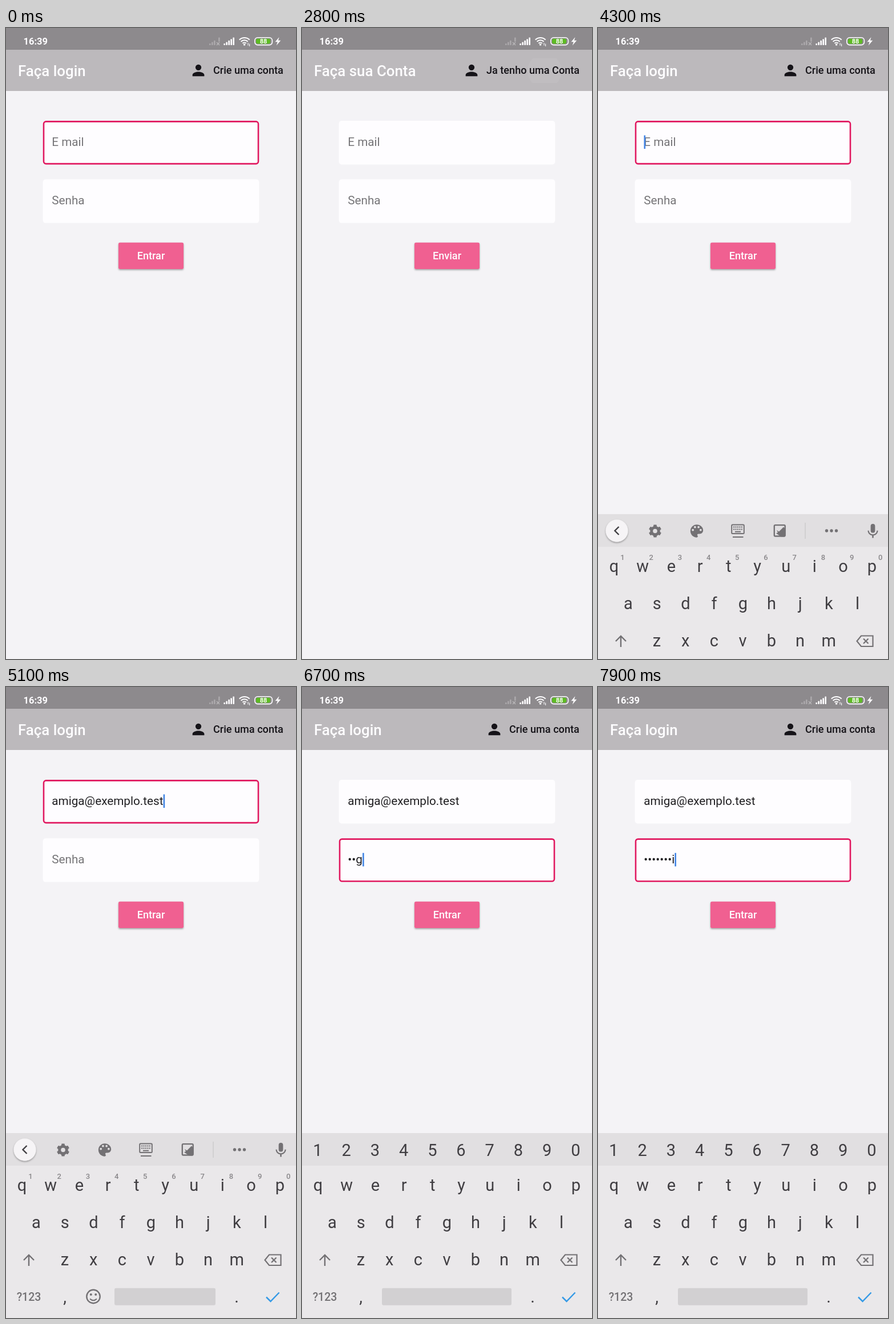
An HTML page that plays this animation: 508 px wide and 1102 px high, repeating every 8000 ms.

```html
<!DOCTYPE html>
<html lang="pt">
<head>
<meta charset="utf-8">
<title>Login</title>
<style>
html, body { margin: 0; width: 100%; height: 100%; overflow: hidden; background: #f4f3f6; }
svg { display: block; width: 508px; height: 1102px; font-family: Roboto, Arial, sans-serif; }
.mid { text-anchor: middle; }
.medium { font-weight: 500; }
.title { font-size: 25.85px; fill: #fefdff; }
.action { font-size: 18.1px; fill: #151318; }
.field { font-size: 20.7px; fill: #212023; }
.hint { fill: #767578; }
.key { font-size: 29px; fill: #403e42; text-anchor: middle; }
.sup { font-size: 13px; fill: #89878a; text-anchor: middle; font-weight: 500; }
.line { fill: none; stroke: #737174; stroke-width: 2.4; }
.solid { fill: #737174; }
.ring { fill: none; stroke: #e0185f; stroke-width: 2.6; }
</style>
</head>
<body>
<svg viewBox="0 0 508 1102" xmlns="http://www.w3.org/2000/svg">
  <defs>
    <filter id="soft" x="-30%" y="-30%" width="160%" height="170%">
      <feDropShadow dx="0" dy="1.6" stdDeviation="1.5" flood-color="#000" flood-opacity=".36"/>
    </filter>
    <clipPath id="ink"><rect x="274" y="53" width="212" height="43" rx="3"/></clipPath>
  </defs>

  <rect width="508" height="1102" fill="#f4f3f6"/>
  <rect width="508" height="110" fill="#bcb9bc"/>
  <rect width="508" height="38" fill="#8d8a8d"/>

  <g id="status" fill="#fefdff">
    <text x="30.5" y="29.3" font-size="16.5" font-weight="600">16:39</text>
    <g id="bars"></g>
    <path d="M369 25l5 5m0-5l-5 5" stroke="#bab8ba" stroke-width="1.4"/>
    <g fill="none" stroke="#fefdff" stroke-width="2">
      <path d="M408.7 20.6a12.8 12.8 0 0 1 18 0M411.6 23.8a8.6 8.6 0 0 1 12 0M414.4 26.8a4.6 4.6 0 0 1 6.4 0"/>
      <path d="M424 26v4.5m2.6-3v4.5" stroke-width="1.1"/>
    </g>
    <circle cx="417.6" cy="29" r="1.8"/>
    <rect x="435.8" y="16.8" width="30.6" height="12.8" rx="5" fill="#8d8a8d" stroke="#fefdff" stroke-width="1.6"/>
    <rect x="438" y="18.8" width="25" height="8.8" rx="3" fill="#5dbb23"/>
    <text class="mid" x="451" y="27.3" font-size="11" font-weight="600">88</text>
    <path d="M478.5 16l-7 8.3h4.2l-2 6.2 7.5-8.8h-4.4z"/>
  </g>

  <text id="title" class="title medium" x="21" y="84"></text>
  <g clip-path="url(#ink)"><circle id="splash" cx="425" cy="75" r="0" fill="#fff"/></g>
  <g id="account">
    <path d="M12 12a4 4 0 1 0 0-8 4 4 0 0 0 0 8zm0 2c-2.67 0-8 1.34-8 4v2h16v-2c0-2.66-5.33-4-8-4z"
      transform="translate(-15.5 58.5) scale(1.2926)" fill="#151318"/>
    <text id="action" class="action medium" x="26" y="80.3"></text>
  </g>

  <g fill="#fefdff">
    <rect x="64.6" y="162" width="378.8" height="76.4" rx="5"/>
    <rect x="64.6" y="264.2" width="378.8" height="76.4" rx="5"/>
  </g>
  <rect id="ringMail" class="ring" x="66" y="163.4" width="376" height="73.7" rx="4"/>
  <rect id="ringPass" class="ring" x="66" y="265.6" width="376" height="73.7" rx="4"/>
  <text id="mail" class="field" x="80.3" y="206"></text>
  <text id="pass" class="field" x="80.3" y="308"></text>
  <rect id="caret" width="2.6" height="23.5" fill="#4285e4"/>

  <rect x="197" y="374.7" width="114" height="46.2" rx="2.6" fill="#f06091" filter="url(#soft)"/>
  <text id="send" class="action medium mid" x="254" y="404" style="fill:#fefdff"></text>

  <g id="keyboard">
    <rect y="779" width="508" height="323" fill="#eae8ea"/>
    <rect y="779" width="508" height="57" fill="#e1dfe1"/>
    <g id="tools">
      <circle cx="33" cy="808" r="19.5" fill="#f6f4f6" filter="url(#soft)"/>
      <path class="line" d="M36.5 801l-7 7 7 7" style="stroke:#403e42"/>
      <g id="icons">
        <g id="gear" transform="translate(100 808.5)">
          <circle class="line" r="6.3" style="stroke-width:5"/>
        </g>
        <g transform="translate(173 808.5) scale(1.24)">
          <path class="solid" d="M0-9c-5 0-9 4-9 9s4 9 9 9c.8 0 1.5-.7 1.5-1.5 0-.4-.2-.7-.4-1-.2-.3-.4-.6-.4-1 0-.8.7-1.5 1.5-1.5H4c2.8 0 5-2.2 5-5C9-5.400 5-9 0-9z"/>
          <g fill="#e1dfe1">
            <circle cx="-5.500" cy="-1.500" r="1.500"/><circle cx="-2.500" cy="-5.500" r="1.500"/>
            <circle cx="2.500" cy="-5.500" r="1.500"/><circle cx="5.500" cy="-1.500" r="1.500"/>
          </g>
        </g>
        <rect class="line" x="234.200" y="797.500" width="21.600" height="15.500" rx="1.500" style="stroke-width:2"/>
        <path class="line" d="M237 801.500h16M237 805.500h16" stroke-dasharray="2.200 1.200" style="stroke-width:2.200"/>
        <path class="line" d="M240 809.800h10M236 819h18.500" style="stroke-width:2"/>
        <path class="line" d="M318 817.500h-7.500q-1.700 0-1.700-1.700v-16q0-1.700 1.700-1.700h15.500q1.700 0 1.700 1.700v16q0 1.700-1.700 1.700z"/>
        <path class="solid" d="M313 807l4 2.500 8-8 2 2v15h-6l-9-6 3-1.500z"/>
        <path d="M363 794v28" stroke="#c9c7c9" stroke-width="1.300"/>
        <g class="solid"><circle cx="400.500" cy="808" r="2.700"/><circle cx="409" cy="808" r="2.700"/><circle cx="417.500" cy="808" r="2.700"/></g>
      </g>
      <text id="suggest" class="mid" x="254" y="815" font-size="20" fill="#403e42"></text>
      <path class="solid" transform="translate(466 793.500) scale(1.290)" d="M12 14a3 3 0 0 0 3-3V5a3 3 0 0 0-6 0v6a3 3 0 0 0 3 3zm5.300-3c0 3-2.540 5.100-5.300 5.100S6.700 14 6.700 11H5c0 3.400 2.700 6.200 6 6.700V21h2v-3.300c3.300-.5 6-3.300 6-6.700z"/>
      <g id="sups"></g>
    </g>
    <g id="digits"></g>
    <g id="letters"></g>
    <path class="line" d="M40 1011v-19M31 1001l9-9 9 9"/>
    <path class="line" d="M461 991.500h20.500v18.500H461l-7.500-9.250zM465 996.500l8.500 8.500m0-8.500l-8.500 8.500" style="stroke-width:2.200"/>
    <text class="mid" x="40" y="1072" font-size="19.5" fill="#737174" font-weight="500">?123</text>
    <text class="key" x="103" y="1075">,</text>
    <text class="key" x="404" y="1075">.</text>
    <g id="smile">
      <circle class="line" cx="153" cy="1064.500" r="11.700"/>
      <path class="line" d="M147 1068.500q6 5.500 12 0" style="stroke-width:2"/>
      <circle class="solid" cx="148.800" cy="1061" r="2"/><circle class="solid" cx="157.200" cy="1061" r="2"/>
    </g>
    <rect id="space" y="1049.800" height="30" rx="3" fill="#d2d0d2"/>
    <path d="M456 1065.500l7.500 7.500 15-15.500" fill="none" stroke="#359ae6" stroke-width="2.500"/>
    <g id="popup">
      <rect x="-25" y="-117" width="50" height="144" rx="5" fill="#fdfcfe" filter="url(#soft)"/>
      <text id="popChar" class="mid" y="-67.500" font-size="36" fill="#403e42"></text>
      <g fill="#403e42"><circle cx="8" cy="-53" r="1.200"/><circle cx="12.500" cy="-53" r="1.200"/><circle cx="17" cy="-53" r="1.200"/></g>
    </g>
  </g>
</svg>
<script>
const LOOP = 8000, TICK = 100, PITCH = 50.2;
const MAIL = 'amiga@exemplo.test';
const SECRET = 'wdguemti';
const $ = id => document.getElementById(id);
const set = (el, attrs) => { for (const k in attrs) el.setAttribute(k, attrs[k]); };

// Value of the latest step at or before t.
const hold = (t, steps) => steps.reduce((v, [at, next]) => t >= at ? next : v, steps[0][1]);

// Linear value between points.
function ramp(t, points) {
  const i = points.findIndex(p => p[0] > t);
  if (i === 0) return points[0][1];
  if (i < 0) return points[points.length - 1][1];
  const [a, x] = points[i - 1], [b, y] = points[i];
  return x + (y - x) * (t - a) / (b - a);
}

// Keyboard layout: letters, first centre, row centre.
const rows = [['qwertyuiop', 28, 870], ['asdfghjkl', 53, 935], ['zxcvbnm', 103, 1000]];
const keys = {};
const label = (cls, x, y, s) => `<text class="${cls}" x="${x}" y="${y}">${s}</text>`;
let letters = '', digits = '', sups = '';
for (const [chars, x0, y] of rows) {
  [...chars].forEach((c, i) => {
    const x = x0 + i * PITCH;
    keys[c] = [x, y];
    letters += label('key', x, y + 9.5, c);
  });
}
[...'1234567890'].forEach((d, i) => {
  digits += label('key', 27.5 + i * PITCH, 819, d);
  sups += label('sup', 43 + i * PITCH, 858.5, d);
});
$('letters').innerHTML = letters;
$('digits').innerHTML = digits;
$('sups').innerHTML = sups;

let bars = '';
for (const [x, color] of [[356, '#aba8ab'], [381.3, '#fefdff']]) {
  for (let i = 0; i < 5; i++) {
    if (x < 380 && i === 3) continue;
    const h = 3 + i * 2.6, cut = x < 380 && i === 4 ? 6 : 0;
    bars += `<rect x="${x + i * 4}" y="${30 - h}" width="2.7" height="${h - cut}" rx="1" fill="${color}"/>`;
  }
}
$('bars').innerHTML = bars;

let teeth = '';
for (let a = 0; a < 360; a += 60)
  teeth += `<rect class="solid" x="-2.8" y="-11" width="5.6" height="5" rx="1" transform="rotate(${a})"/>`;
$('gear').innerHTML += teeth;

// Each press shows its popup for one tick, then the letter lands.
const pressTimes = [6200, 6400, 6600, 6800, 7000, 7200, 7500, 7800];
const presses = [[4500, 'a'], ...pressTimes.map((at, i) => [at, SECRET[i]])];

const mailSteps = [[0, ''], [4600, 'a'], [4900, MAIL]];
const ringMail = [[0, 1], [400, 1], [600, 0], [3900, 0], [4000, .12], [4100, .65], [4200, 1], [5100, 1], [5300, 0]];
const ringPass = [[5100, 0], [5300, 1]];
const caretAlpha = [[3900, 0], [4000, 1], [5600, 1], [5700, .45], [5800, 0], [6100, 0], [6200, 1]];
const slide = [[4100, 323], [4200, 205], [4300, 70], [4400, 0]];
const inkAlpha = [[0, 0], [800, .06], [900, .1], [1000, .07], [1100, .03], [1200, 0],
  [2800, .06], [2900, .1], [3000, .04], [3100, 0]];

function fill(el, value, hint) {
  el.textContent = value || hint;
  el.setAttribute('class', value ? 'field' : 'field hint');
  return value ? el.getComputedTextLength() : 0;
}

function draw(t) {
  const signup = t >= 900 && t < 2900;
  $('title').textContent = signup ? 'Faça sua Conta' : 'Faça login';
  $('action').textContent = signup ? 'Ja tenho uma Conta' : 'Crie uma conta';
  $('send').textContent = signup ? 'Enviar' : 'Entrar';
  set($('account'), { transform: `translate(${signup ? 297 : 337} 0)` });
  const since = t < 2000 ? t - 800 : t - 2800;
  set($('splash'), { r: Math.max(0, 30 + since * .4), opacity: hold(t, inkAlpha) });

  const typed = pressTimes.filter(at => t >= at + TICK).length;
  const masked = typed ? '•'.repeat(typed - 1) + SECRET[typed - 1] : '';
  const mailWidth = fill($('mail'), hold(t, mailSteps), 'E mail');
  const passWidth = fill($('pass'), masked, 'Senha');
  const onPass = t >= 5200;
  set($('ringMail'), { opacity: ramp(t, ringMail) });
  set($('ringPass'), { opacity: ramp(t, ringPass) });
  set($('caret'), {
    x: 80.5 + (onPass ? passWidth : mailWidth),
    y: onPass ? 289.8 : 187.5,
    opacity: ramp(t, caretAlpha)
  });

  const secure = t >= 5300, suggesting = t >= 4700 && t < 4900;
  set($('keyboard'), { transform: `translate(0 ${ramp(t, slide)})` });
  set($('tools'), { display: secure ? 'none' : 'inline' });
  set($('smile'), { display: secure ? 'none' : 'inline' });
  set($('digits'), { display: secure ? 'inline' : 'none' });
  set($('icons'), { display: suggesting ? 'none' : 'inline' });
  $('suggest').textContent = suggesting ? MAIL : '';
  set($('space'), { x: secure ? 140 : 190, width: secure ? 227 : 177 });

  const press = presses.find(([at]) => t >= at && t < at + TICK);
  set($('popup'), { display: press ? 'inline' : 'none' });
  if (press) {
    $('popChar').textContent = press[1];
    set($('popup'), { transform: `translate(${keys[press[1]].join(' ')})` });
  }
}

const start = performance.now();
let last = -1;
function frame() {
  const now = Math.max(0, performance.now() - start) % LOOP;
  const t = Math.floor(now / TICK) * TICK;
  if (t !== last) draw(last = t);
  requestAnimationFrame(frame);
}
frame();
</script>
</body>
</html>
```
